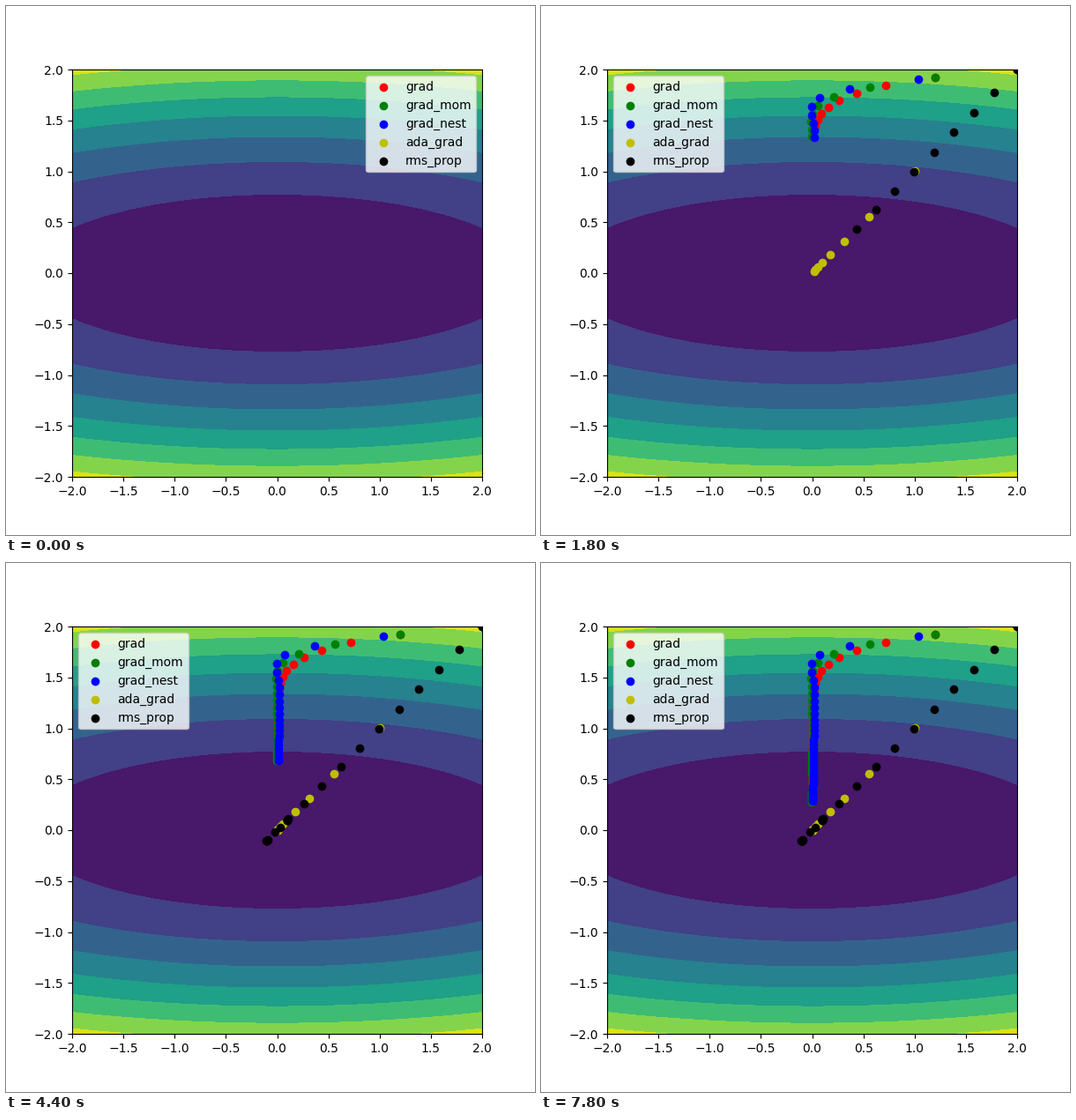
A matplotlib script for the animation above (8000 ms loop, 600 by 600 pixels).

```python
import numpy as np
import matplotlib.pyplot as plt
from matplotlib.animation import FuncAnimation

FRAMES = 40
INTERVAL = 200
START = np.array([2.0, 2.0])
LR, BETA = 0.02, 0.2


def grad(p):
    return np.array([20.0, 2.0]) * p


def gradient_descent():
    p = START.copy()
    while True:
        yield p
        p = p - LR * grad(p)


def momentum():
    p, v = START.copy(), np.zeros(2)
    while True:
        yield p
        v = BETA * v + LR * grad(p)
        p = p - v


def nesterov():
    p, v, prev = START.copy(), np.zeros(2), 0.0
    while True:
        yield p
        g = grad(p)
        v = BETA * v + LR * (g + BETA * (g - prev))
        prev = g[1]  # both axes are corrected by the last y slope
        p = p - v


def adagrad(lr=1.0):
    p, total = START.copy(), np.zeros(2)
    while True:
        yield p
        g = grad(p)
        total = total + g ** 2
        p = p - lr * g / np.sqrt(total + 1e-12)


def rmsprop(lr=0.2, rho=0.2):
    p, mean = START.copy(), np.zeros(2)
    while True:
        yield p
        g = grad(p)
        mean = rho * mean + (1 - rho) * g ** 2
        p = p - lr * g / np.sqrt(mean + 1e-12)


def path(steps):
    return np.array([next(steps) for _ in range(FRAMES)])


METHODS = [
    ("grad", "r", gradient_descent),
    ("grad_mom", "g", momentum),
    ("grad_nest", "b", nesterov),
    ("ada_grad", "y", adagrad),
    ("rms_prop", "k", rmsprop),
]

fig, ax = plt.subplots(figsize=(6, 6), dpi=100)
axis = np.linspace(-2, 2, 100)
X, Y = np.meshgrid(axis, axis)
ax.contourf(X, Y, X ** 2 + 10 * Y ** 2, levels=np.arange(0, 49, 6))

paths = [path(method()) for _, _, method in METHODS]
dots = [ax.scatter([], [], color=color, label=name)
        for name, color, _ in METHODS]
ax.set_xlim(-2, 2)
ax.set_ylim(-2, 2)
legend = ax.legend(loc="upper right")


def update(i):
    for dot, points in zip(dots, paths):
        dot.set_offsets(points[:i])
    # the legend gives way once points run into its corner
    legend.set_loc("upper right" if i < 2 else "upper left")
    return dots


anim = FuncAnimation(fig, update, frames=FRAMES, interval=INTERVAL,
                     init_func=lambda: update(0), repeat=True, repeat_delay=0)
plt.show()
```
